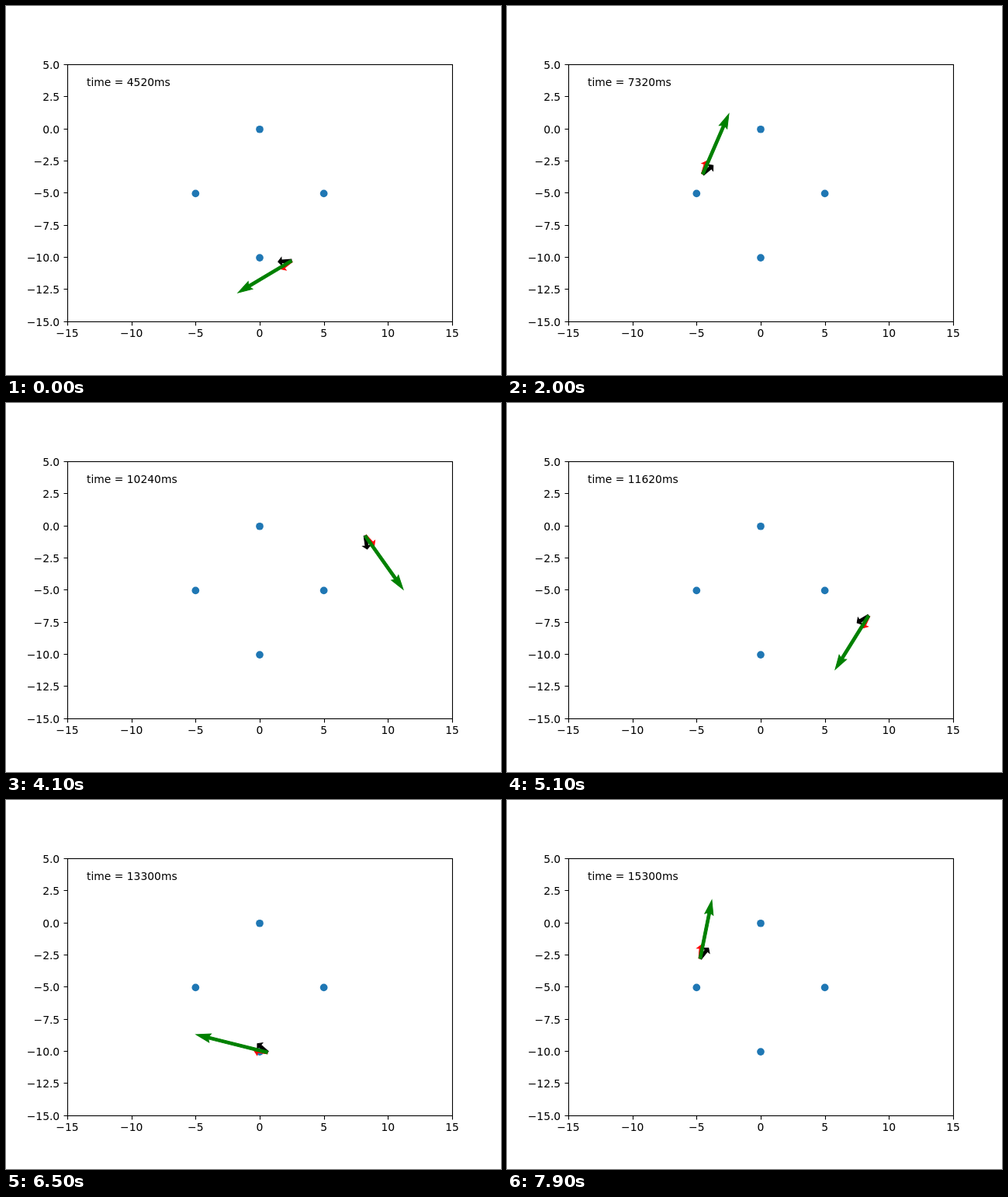
Recreate the animation shown at these times as an HTML page with a canvas. Size 638 px wide and 475 px high, loop 8000 ms.

```html
<!DOCTYPE html>
<html lang="en">
<head>
<meta charset="utf-8">
<title>Steering vectors</title>
<style>
  html, body { margin: 0; width: 100%; height: 100%; overflow: hidden; background: #fff; }
  canvas { display: block; width: 638px; height: 475px; }
</style>
</head>
<body>
<canvas id="plot"></canvas>
<script>
const canvas = document.getElementById('plot');
const ctx = canvas.getContext('2d');
const ratio = window.devicePixelRatio || 1;
canvas.width = 638 * ratio;
canvas.height = 475 * ratio;
ctx.scale(ratio, ratio);

const LOOP = 8000, STEP = 100, UNIT = 496 / 30;
const LEFT = 79.5, TOP = 75.5, WIDTH = 496, HEIGHT = 331;
const SLIP = 7 * Math.PI / 180, STEER = 27 * Math.PI / 180;
const px = x => 79 + (x + 15) * UNIT;
const py = y => 76.07 + (5 - y) * UNIT;

// Key points of the drive: step, clock (ms), position (px), velocity (px/s)
const path = [
  [0, 4520, 368, 328, -69, 41],
  [10, 5960, 263, 316.7, -54.5, -59],
  [30, 8660, 338, 137, 89, -30],
  [41, 10240, 463, 171, 49, 69],
  [51, 11620, 466, 274, -43, 69],
  [65, 13300, 337, 325, -92, -23],
  [79, 15300, 249, 204, 15, -75]
].map(([step, clock, x, y, vx, vy]) => ({ step, clock, x, y, vx, vy }));

// Cubic through two points with given speeds; returns place and speed.
function hermite(p, q, v, w, span, u) {
  const u2 = u * u, u3 = u2 * u;
  return [
    p + (q - p) * (3 * u2 - 2 * u3) + span * (v * (u3 - 2 * u2 + u) + w * (u3 - u2)),
    (q - p) / span * 6 * (u - u2) + v * (3 * u2 - 4 * u + 1) + w * (3 * u2 - 2 * u)
  ];
}

function stateAt(step) {
  let i = 0;
  while (i < path.length - 2 && step >= path[i + 1].step) i++;
  const a = path[i], b = path[i + 1];
  const part = (step - a.step) / (b.step - a.step);
  const clock = Math.round((a.clock + (b.clock - a.clock) * part) / 20) * 20;
  const u = (clock - a.clock) / (b.clock - a.clock);
  const span = (b.clock - a.clock) / 1000;
  const [x, vx] = hermite(a.x, b.x, a.vx, b.vx, span, u);
  const [y, vy] = hermite(a.y, b.y, a.vy, b.vy, span, u);
  return { clock, x, y, angle: Math.atan2(vy, vx), speed: Math.hypot(vx, vy) };
}

function arrow(x, y, angle, length, head, neck, barb, color) {
  const half = 1.86;
  ctx.save();
  ctx.translate(x, y);
  ctx.rotate(angle);
  ctx.fillStyle = ctx.strokeStyle = color;
  ctx.lineWidth = 1;
  ctx.beginPath();
  ctx.moveTo(0, -half);
  ctx.lineTo(length - neck, -half);
  ctx.lineTo(length - head, -barb);
  ctx.lineTo(length, 0);
  ctx.lineTo(length - head, barb);
  ctx.lineTo(length - neck, half);
  ctx.lineTo(0, half);
  ctx.closePath();
  ctx.fill();
  ctx.stroke();
  ctx.restore();
}

function label(text, x, y, align) {
  ctx.textAlign = align;
  ctx.fillText(text.replace('-', '\u2212'), x, y);
}

function drawAxes() {
  ctx.strokeStyle = ctx.fillStyle = '#000';
  ctx.lineWidth = 1.1;
  ctx.font = '13.89px "DejaVu Sans", sans-serif';
  ctx.strokeRect(LEFT, TOP, WIDTH, HEIGHT);
  ctx.beginPath();
  for (let v = -15; v <= 15; v += 5) {
    const x = Math.round(px(v)) + 0.5;
    ctx.moveTo(x, TOP + HEIGHT);
    ctx.lineTo(x, TOP + HEIGHT + 5);
    label(String(v), px(v), 426, 'center');
  }
  for (let v = -15; v <= 5; v += 2.5) {
    const y = Math.round(py(v));
    ctx.moveTo(LEFT, y - 0.5);
    ctx.lineTo(LEFT - 5, y - 0.5);
    label(v.toFixed(1), 69.2, y + 5, 'right');
  }
  ctx.stroke();
}

function drawDots() {
  ctx.fillStyle = '#1f77b4';
  for (const [x, y] of [[0, 0], [5, -5], [0, -10], [-5, -5]]) {
    ctx.beginPath();
    ctx.arc(px(x), py(y), 4.86, 0, 2 * Math.PI);
    ctx.fill();
  }
}

function draw(ms) {
  const { clock, x, y, angle, speed } = stateAt(Math.floor((ms % LOOP) / STEP));
  ctx.fillStyle = '#fff';
  ctx.fillRect(0, 0, 638, 475);
  drawDots();
  arrow(x, y, angle - SLIP, 17.3, 4.5, 4.5, 5.2, '#f00');
  arrow(x, y, angle + STEER, 17.3, 4.5, 4.5, 5.2, '#000');
  arrow(x, y, angle, speed, 18.6, 16.74, 5.58, '#008000');
  drawAxes();
  label(`time = ${clock}ms`, 104, 103, 'left');
}

let start;
function tick(now) {
  if (start === undefined) start = now;
  draw(now - start);
  requestAnimationFrame(tick);
}
draw(0);
requestAnimationFrame(tick);
</script>
</body>
</html>
```
